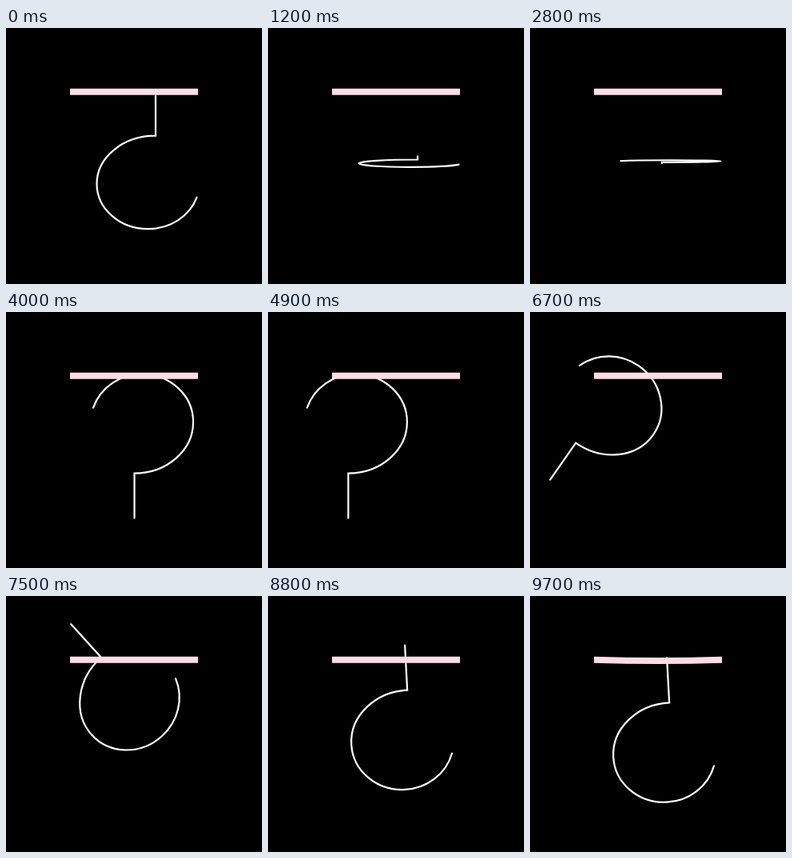
An HTML page that plays this animation: 320x320 px, repeating every 10000 ms.

```html
<!DOCTYPE html>
<html lang="en">
<head>
<meta charset="utf-8">
<style>
  html, body { margin: 0; width: 100%; height: 100%; overflow: hidden; background: #000; }
  svg { display: block; width: 100vw; height: 100vh; }
  path { fill: none; }
  #glyph { stroke: #fff; stroke-width: 2.2; stroke-linecap: round; vector-effect: non-scaling-stroke; }
  #bar { stroke: #ffdce4; stroke-width: 8; }
</style>
</head>
<body>
<svg viewBox="0 0 320 320">
  <path id="glyph" d="M11-90.5V-34.5A73.5 64 0 0 0-62.5 29.5A64 60 0 0 0 1.5 89.5A64 62 0 0 0 62.5 47.5"/>
  <path id="bar"/>
</svg>
<script>
const LOOP = 10000, STEP = 100, LAST = 9700;
const FLIP = 2400, LAND = 8945, BAR_Y = 79.7;
const glyph = document.getElementById('glyph');
const bar = document.getElementById('bar');

const linear = u => u;
const quadIn = u => u * u;
const sine = u => (1 - Math.cos(Math.PI * u)) / 2;
const cubic = u => u < 0.5 ? 4 * u ** 3 : 1 - 4 * (1 - u) ** 3;

// Eased progress from 0 to 1 between two times.
const ramp = (t, from, to, ease = sine) =>
  ease(Math.min(Math.max((t - from) / (to - from), 0), 1));

const x = t => 176
  - 89 * ramp(t, 3814, 4614, cubic)
  + 89 * ramp(t, 4614, 5430)
  - 96 * ramp(t, 5430, 6343)
  + 85 * ramp(t, 6370, 8300);

// Hop up, hover, then fall onto the bar.
const y = t => 167.1
  - 58.5 * ramp(t, 6108, 7400)
  + 17.4 * ramp(t, 7400, 8000)
  + 41.1 * ramp(t, 8200, LAND, quadIn);

const angle = t => t < FLIP ? 0 : -180 + 176.9 * ramp(t, 6108, 8128);

// Flatten and regrow exponentially.
const scaleY = t => Math.exp(4.28 * (ramp(t, 2300, 3950, quadIn) - ramp(t, -30, 2000, linear)));

// Damped swing of the bar after the landing.
function swing(t) {
  const n = (t - LAND) / 369;
  return n < 0 ? 0 : 21 * 0.65 ** n * Math.sin(Math.PI * n);
}

function draw(now) {
  const t = Math.min(Math.floor(now % LOOP / STEP) * STEP, LAST);
  const dip = swing(t);
  glyph.setAttribute('transform',
    `translate(${x(t)} ${y(t) + dip}) rotate(${angle(t)}) scale(1 ${scaleY(t)})`);
  bar.setAttribute('d', `M80 ${BAR_Y}Q160 ${BAR_Y + 2 * dip} 240 ${BAR_Y}`);
}

const start = performance.now();
function tick() {
  draw(performance.now() - start);
  requestAnimationFrame(tick);
}
tick();
</script>
</body>
</html>
```
